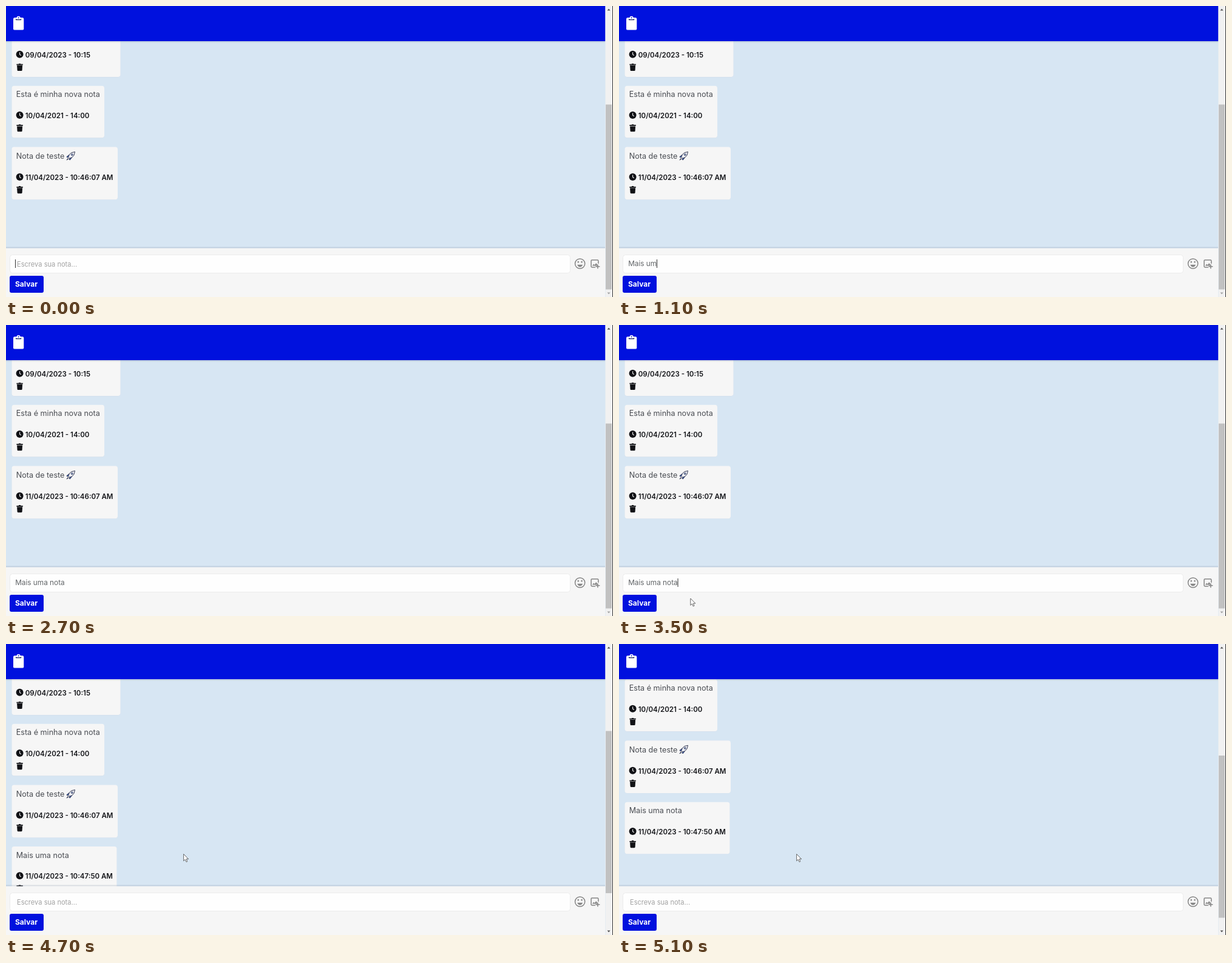
An HTML page for the animation above (5.8 s loop, 1000 px wide and 480 px high).

```html
<!DOCTYPE html>
<html lang="pt">
<head>
<meta charset="utf-8">
<title>Notas</title>
<style>
  html, body { margin: 0; width: 100%; height: 100%; overflow: hidden; }
  svg.stage { display: block; width: 1000px; height: 480px; background: #d7e6f3; }
  text { font-family: Inter, "Open Sans", sans-serif; white-space: pre; }
  .title { font-size: 12.6px; fill: #4a4d53; }
  .date { font-size: 11.5px; font-weight: 600; fill: #15161a; }
  .typed { font-size: 11.8px; fill: #626568; }
  .hint { font-size: 11.1px; fill: #a2a2a2; }
  .save { font-size: 12px; font-weight: 700; fill: #fff; }
  .line { fill: none; stroke: #858585; stroke-width: 1.5; }
</style>
</head>
<body>
<svg class="stage" viewBox="0 0 1000 480">
  <defs>
    <linearGradient id="fade" x2="0" y2="1">
      <stop stop-color="#5c708c" stop-opacity=".28"/>
      <stop offset="1" stop-color="#5c708c" stop-opacity="0"/>
    </linearGradient>
    <g id="clock">
      <circle r="6" fill="#111216"/>
      <path d="M0-3.6V.2L2.2 1.7" fill="none" stroke="#f6f6f6" stroke-width="1.1"/>
    </g>
    <path id="trash" fill="#111216" d="M-5.2-5.2h3.2l.8-.9h2.4l.8.9h3.2v1.7H-5.2zM-4.5-2.9H4.5L4 4.9Q3.9 6 2.8 6H-2.8Q-3.9 6-4 4.9z"/>
    <g id="rocket" stroke="#252a45" stroke-width=".9" stroke-linejoin="round">
      <path d="M-2-2.2L-6.4 1-5.8 2.4-2.8 1.6zM2.2 2L-1 6.4-2.4 5.8-1.6 2.8z" fill="#4a72c8"/>
      <path d="M7-7Q.6-6.6-2.2-2.4L-3.8 1.8-1.8 3.8 2.4 2.2Q6.6-.6 7-7Z" fill="#eef0f7"/>
      <circle cx="2.3" cy="-2.3" r="1.4" fill="#a9c3ee"/>
      <path d="M-4 3.4L-6.6 6.6-3.4 4.6" fill="#8b8fa0"/>
    </g>
  </defs>

  <g id="notes"></g>

  <rect width="987.4" height="58" fill="#0011de"/>
  <rect y="58" width="987" height="3" fill="url(#fade)"/>
  <rect x="12" y="19.2" width="17.3" height="20.4" rx="2.2" fill="#fff"/>
  <circle cx="20.6" cy="19.8" r="3.1" fill="#fff"/>
  <circle cx="20.6" cy="19.6" r="1" fill="#0011de"/>
  <path d="M16.6 21.2v1.4h8v-1.4" fill="none" stroke="#10185e" stroke-width="1.1"/>

  <rect y="396.5" width="987" height="3" fill="url(#fade)" transform="matrix(1 0 0 -1 0 796)"/>
  <rect y="399.5" width="987" height="80.5" fill="#f6f6f6"/>
  <rect x="6.5" y="410.5" width="923" height="30" rx="4" fill="#fefefe" stroke="#ececec"/>
  <text id="hint" class="hint" x="18" y="429.7">Escreva sua nota...</text>
  <text id="typed" class="typed" x="15.2" y="429.2"></text>
  <rect id="caret" y="418" width="1" height="14" fill="#333"/>

  <g class="line">
    <circle cx="945.6" cy="425" r="8.1"/>
    <path d="M941.2 426.8h8.8q-1.3 3.8-4.4 3.8t-4.4-3.8z" fill="#858585" stroke="none"/>
    <path d="M942.7 421v2.6M948.5 421v2.6" stroke-width="2.2"/>
    <path d="M975.8 425v-4.6q0-1.4-1.4-1.4h-9q-1.4 0-1.4 1.4v9.2q0 1.4 1.4 1.4h5.4"/>
    <path d="M965.8 428.6l2.4-3.2 1.6 1.8 2.4-3.2 1.6 2.4v2.2z" fill="#858585" stroke="none"/>
    <path d="M974.8 426.2v7M971.3 429.7h7"/>
  </g>

  <rect id="button" x="6" y="445" width="56" height="28" rx="3"/>
  <text class="save" x="15" y="462.7">Salvar</text>

  <rect x="987.4" width="12.6" height="480" fill="#f1f1f1"/>
  <rect id="thumb" x="988" width="10" fill="#c1c1c1"/>
  <path d="M990.5 7.5l2.5-3 2.5 3z" fill="#505050"/>
  <path id="down" d="M990.5 472.5l2.5 3 2.5-3z"/>
  <rect x="999" width="1" height="480" fill="#333"/>

  <path id="arrow" fill="#fff" stroke="#444" stroke-width=".8" stroke-linejoin="round"
    d="M0 0V11.3L2.6 8.9 4.4 13 6.2 12.2 4.5 8.2H8z"/>
  <path id="hand" fill="#fff" stroke="#222" stroke-width=".8" stroke-linejoin="round"
    d="M-1.3 1Q-1.3-.2 0-.2T1.3 1V5Q2-.1 3.6 5.2 5-.1 5.8 5.8 7.5 5 7.5 7V11Q7.3 13 6 15.5H-.7Q-2.5 12.5-4.6 9.8-5.4 8-4 7.8-2.7 8-1.3 9.8Z"/>
</svg>
<script>
const LOOP = 5800;
const byId = id => document.getElementById(id);
const set = (el, attrs) => Object.entries(attrs).forEach(([k, v]) => el.setAttribute(k, v));
const show = (el, on) => set(el, { visibility: on ? "visible" : "hidden" });

// top, width, height, title, date
const notes = [
  [31.5, 179, 85.5, "", "09/04/2023 - 10:15"],
  [131.8, 152.5, 85.5, "Esta é minha nova nota", "10/04/2021 - 14:00"],
  [232.5, 174.5, 86.7, "Nota de teste", "11/04/2023 - 10:46:07 AM"],
  [334, 173, 85.5, "Mais uma nota", "11/04/2023 - 10:47:50 AM"]
];

byId("notes").innerHTML = notes.map(([y, w, h, title, date], i) => {
  const mid = h - 36.5;
  return `<g transform="translate(0 ${y})">
    <rect x="9.5" y=".4" width="${w}" height="${h}" rx="4" fill="#d0dce9"/>
    <rect x="9.5" width="${w}" height="${h}" rx="4" fill="#f6f6f6"/>
    <text class="title" x="16.7" y="${mid - 30.4}">${title}</text>
    ${i === 2 ? '<use href="#rocket" x="106.5" y="15"/>' : ""}
    <use href="#clock" x="22.6" y="${mid - .7}"/>
    <text class="date" x="31.7" y="${mid + 4.3}">${date}</text>
    <use href="#trash" x="22.6" y="${mid + 20.5}"/>
  </g>`;
}).join("");
const added = byId("notes").lastElementChild;

// time, text, caret visible
const typing = [
  [0, "", 1], [100, "M", 1], [300, "Mais", 1], [800, "Mais ", 1],
  [900, "Mais u", 1], [1100, "Mais um", 1], [1200, "Mais uma", 1],
  [1400, "Mais uma ", 1], [1600, "Mais uma n", 1], [1800, "Mais uma no", 1],
  [2100, "Mais uma not", 1], [2200, "Mais uma nota", 1],
  [2700, "Mais uma nota", 0], [3300, "Mais uma nota", 1],
  [3800, "Mais uma nota", 0], [4200, "", 0]
];
// time, shape, x, y
const pointer = [
  [0, "", 0, 0], [3500, "arrow", 117.8, 451], [3600, "arrow", 76, 452],
  [3700, "hand", 33, 448.5], [4600, "arrow", 150, 408], [4700, "arrow", 292.6, 346.5]
];
// time, scroll distance
const scroll = [[0, 0], [4900, 17.6], [5000, 52], [5100, 73.3]];

const at = (steps, t) => steps.findLast(step => step[0] <= t);

function draw(t) {
  const [, text, caretOn] = at(typing, t);
  const [, shape, x, y] = at(pointer, t);
  const [, offset] = at(scroll, t);
  const saved = t >= 4200;

  const typed = byId("typed");
  typed.textContent = text;
  show(byId("hint"), !text);
  show(byId("caret"), caretOn);
  set(byId("caret"), { x: 15 + (text ? typed.getComputedTextLength() : 0) });

  for (const id of ["arrow", "hand"]) {
    show(byId(id), id === shape);
    set(byId(id), { transform: `translate(${x} ${y})` });
  }
  set(byId("button"), { fill: shape === "hand" ? "#000d96" : "#0011de" });

  show(added, saved);
  set(byId("notes"), { transform: `translate(0 ${-offset})` });
  set(byId("thumb"), saved
    ? { y: 143.5 + offset * .553, height: 267.5 }
    : { y: 162.5, height: 305 });
  set(byId("down"), { fill: saved ? "#505050" : "#a3a3a3" });
}

const start = performance.now();
function tick() {
  draw((performance.now() - start) % LOOP);
  requestAnimationFrame(tick);
}
tick();
</script>
</body>
</html>
```
